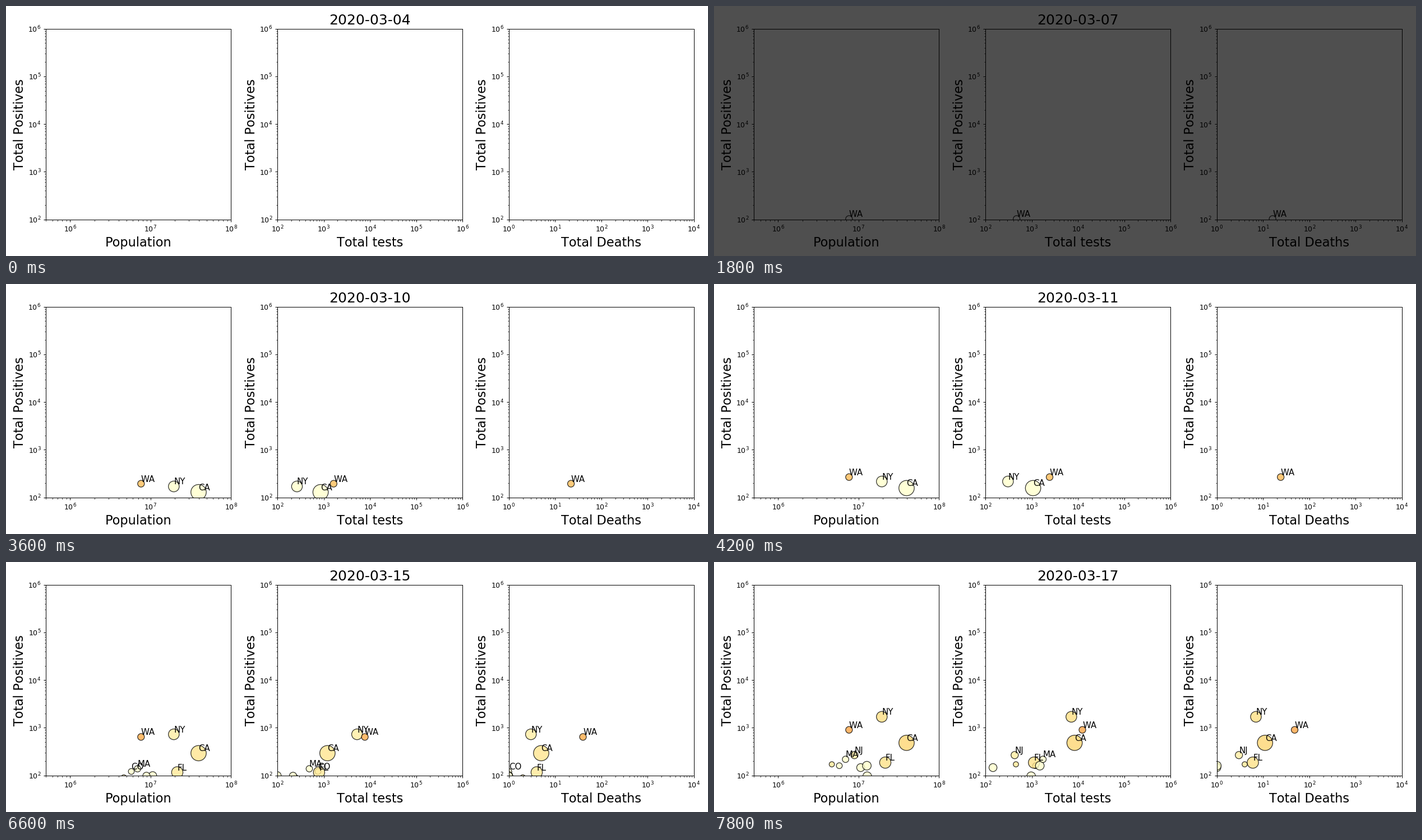
Animation, 1252 px wide and 447 px high, one loop 8 s. Source, as a matplotlib script:

```python
import math

import matplotlib.pyplot as plt
import numpy as np
from matplotlib.animation import FuncAnimation
from matplotlib.colors import to_rgba
from matplotlib.patches import Rectangle

W, H, DPI = 1252, 447, 90
STEP_MS, STEPS_PER_DAY, STEPS = 200, 3, 40
FIRST_DAY, DIM_DAY, LAST_DAY = 4, 7, 17      # days of March 2020
DIM = "#4f4f4f"
ALPHA = 0.8
TOP_LABELS = 6

# Early states: population in millions, then positives, tests and deaths
# on the latest of the key days; values in between are interpolated.
KEY_DAYS = [7, 8, 11, 15, 17]
LEADERS = dict(
    CA=(39.51, [(88, 550, 0), (157, 1073, 0), (293, 1209, 5),
                (483, 8464, 11)]),
    NY=(19.45, [(105, 197, 0), (216, 308, 0), (729, 5272, 3),
                (1700, 7206, 7)]),
    WA=(7.61, [(102, 472, 16), (102, 742, 18), (267, 2443, 24),
               (642, 7764, 40), (904, 12486, 48)]),
)

# Later states grow geometrically: population in millions, final positives,
# tests and deaths, daily growth of positives, daily growth of tests.
FOLLOWERS = dict(
    CO=(5.76, 160, 1216, 1, 1.15, 1.27),
    FL=(21.48, 186, 1126, 6, 1.266, 1.19),
    GA=(10.62, 146, 146, 1, 1.214, 1.214),
    IL=(12.67, 160, 1500, 1, 1.72, 1.34),
    LA=(4.65, 171, 457, 4, 1.37, 1.36),
    MA=(6.89, 218, 1759, 0, 1.257, 1.895),
    NJ=(8.88, 267, 430, 3, 1.65, 1.404),
    PA=(12.80, 96, 975, 0, 1.26, 1.1),
)

PANELS = [("Population", 5e5, 1e8), ("Total tests", 1e2, 1e6),
          ("Total Deaths", 1e0, 1e4)]
LEFT, PITCH, WIDTH = 71.2, 412.8, 330.1
BOTTOM, HEIGHT = 65.4, 340.8

plt.rcParams.update({"font.family": "DejaVu Sans", "font.size": 10,
                     "text.kerning_factor": 6})
fig = plt.figure(figsize=(W / DPI, H / DPI), dpi=DPI, facecolor="white")
backdrop = Rectangle((0, 0), 1, 1, transform=fig.transFigure, fc="white",
                     ec="none", zorder=-10)
fig.add_artist(backdrop)


def put_text(x, y, text, size, **kw):
    """Place text with its baseline at a pixel position from the top left."""
    return fig.text(x / W, 1 - y / H, text, fontsize=size, ha="center",
                    va="baseline", **kw)


def make_panel(index, label, low, high):
    x = LEFT + index * PITCH
    ax = fig.add_axes([x / W, BOTTOM / H, WIDTH / W, HEIGHT / H],
                      facecolor="none")
    ax.set(xscale="log", yscale="log")
    dots = ax.scatter([], [], linewidths=1, edgecolors=[(0, 0, 0, ALPHA)])
    ax.set(xlim=(low, high), ylim=(1e2, 1e6))
    put_text(x + WIDTH / 2, 430, label, 18)
    put_text(30.7 + index * PITCH, H - BOTTOM - HEIGHT / 2,
             "Total Positives", 18, rotation=90, rotation_mode="anchor")
    return ax, dots


panels = [make_panel(i, *p) for i, p in enumerate(PANELS)]
title = put_text(LEFT + PITCH + WIDTH / 2, 33, "", 20)
labels = []


def interpolate(keys, day):
    days = KEY_DAYS[-len(keys):]
    return [round(np.expm1(np.interp(day, days, np.log1p(values))))
            for values in zip(*keys)]


def day_rows(day):
    """State, positives and the three x values for every state."""
    rows = []
    for state, (pop, keys) in LEADERS.items():
        if day >= KEY_DAYS[-len(keys)]:
            positives, tests, deaths = interpolate(keys, day)
            rows.append((state, positives, (pop * 1e6, tests, deaths)))
    back = day - LAST_DAY
    for state, (pop, pos, tests, deaths, grow, test_grow) in FOLLOWERS.items():
        rows.append((state, round(pos * grow ** back),
                     (pop * 1e6, round(tests * test_grow ** back),
                      round(deaths * grow ** back))))
    return sorted(rows)


def fill(deaths, day):
    if day == DIM_DAY:
        return to_rgba(DIM)
    return plt.cm.YlOrRd(math.log10(max(deaths, 1)) / 4, alpha=ALPHA)


def draw(step):
    day = FIRST_DAY + step // STEPS_PER_DAY
    title.set_text(f"2020-03-{day:02d}")
    backdrop.set_facecolor(DIM if day == DIM_DAY else "white")
    while labels:
        labels.pop().remove()

    rows = day_rows(day)
    ranked = sorted(rows, key=lambda r: -r[1])[:TOP_LABELS]
    named = {r[0] for r in ranked if r[1] >= 100}
    for k, (ax, dots) in enumerate(panels):
        shown = [r for r in rows if r[1] > 0 and r[2][k] > 0]
        dots.set_offsets(np.array([(r[2][k], r[1]) for r in shown],
                                  float).reshape(-1, 2))
        dots.set_sizes([r[2][0] / 82300 for r in shown])
        dots.set_facecolors([fill(r[2][2], day) for r in shown])
        for state, positives, xs in shown:
            if state in named and xs[k] >= PANELS[k][1]:
                labels.append(ax.text(xs[k], positives * 1.1, state,
                                      fontsize=12))
    return [title, backdrop]


anim = FuncAnimation(fig, draw, frames=STEPS, interval=STEP_MS,
                     init_func=lambda: draw(0), repeat=True, repeat_delay=0,
                     blit=False)
plt.show()
```
